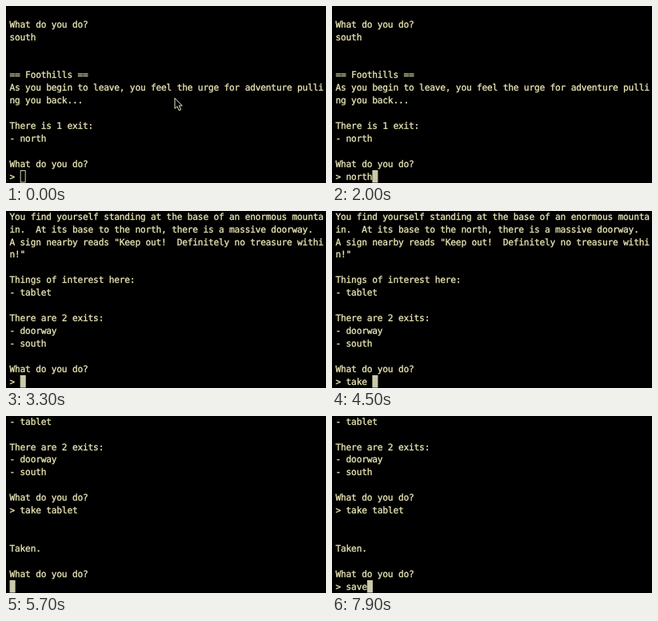
Animation, 400 px wide and 222 px high, one loop 8000 ms. Source, as an HTML page:

```html
<!DOCTYPE html>
<html lang="en">
<head>
<meta charset="utf-8">
<title>Text adventure</title>
<style>
html, body { margin: 0; width: 100%; height: 100%; overflow: hidden; background: #000; }
#screen {
  position: absolute; left: 4.5px; top: -0.3px; margin: 0;
  font: 11.2px/15.92px "DejaVu Sans Mono", monospace; letter-spacing: -0.198px;
  color: #ece8b6; -webkit-text-stroke: 0.3px #ece8b6;
  white-space: pre; text-rendering: geometricPrecision;
}
svg { position: absolute; left: 0; top: 0; }
#cursor { stroke: #d2d0b0; }
.pointer { fill: #000; stroke: #eee9c8; }
</style>
</head>
<body>
<pre id="screen"></pre>
<svg width="400" height="222">
  <rect id="cursor" y="206.5" width="6" height="14.5"/>
  <path id="arrow" class="pointer" d="M211 115.5V128.5L214 126L216.3 131L218.6 130L216.4 125H220.3Z"/>
  <path id="beam" class="pointer" style="fill:none" d="M207.5 113.5H209.5L210.5 114.5L211.5 113.5H213.5M210.5 114.5V125.5M207.5 126.5H209.5L210.5 125.5L211.5 126.5H213.5M209 121.5H212"/>
</svg>
<script>
const LOOP = 8000, CELL = 6.544, LEFT = 4.8;
const FOCUS = 600;
const $ = id => document.getElementById(id);

const foothills = `
What do you do?
south


== Foothills ==
As you begin to leave, you feel the urge for adventure pulli
ng you back...

There is 1 exit:
- north

What do you do?
`;

const mountain = `You find yourself standing at the base of an enormous mounta
in.  At its base to the north, there is a massive doorway.
A sign nearby reads "Keep out!  Definitely no treasure withi
n!"

Things of interest here:
- tablet

There are 2 exits:
- doorway
- south

What do you do?
`;

const taken = `- tablet

There are 2 exits:
- doorway
- south

What do you do?
> take tablet


Taken.

What do you do?
`;

// Each scene: when it appears, when its prompt follows, and the time of each keystroke
const scenes = [
  { at: 0, prompt: 0, text: foothills, input: "north", keys: [1400, 1500, 1600, 1750, 1900] },
  { at: 2300, prompt: 2400, text: mountain, input: "take tablet",
    keys: [4000, 4100, 4200, 4300, 4400, 4700, 4800, 4900, 5000, 5100, 5200] },
  { at: 5700, prompt: 5800, text: taken, input: "save", keys: [7300, 7500, 7600, 7800] }
];

const show = (id, on) => $(id).style.display = on ? "" : "none";

function draw(now) {
  const t = now % LOOP;
  const scene = scenes.findLast(s => t >= s.at);
  const typed = scene.keys.filter(k => t >= k).length;
  const line = t >= scene.prompt ? "> " + scene.input.slice(0, typed) : "";
  const focused = t >= FOCUS;

  const text = scene.text + line;
  if ($("screen").textContent !== text) $("screen").textContent = text;
  $("cursor").setAttribute("x", LEFT + line.length * CELL + 0.3);
  $("cursor").setAttribute("fill", focused ? "#cbc9ab" : "none");
  show("arrow", !focused);
  show("beam", focused && t < scenes[0].keys[0]);
  requestAnimationFrame(draw);
}
draw(performance.now());
</script>
</body>
</html>
```
